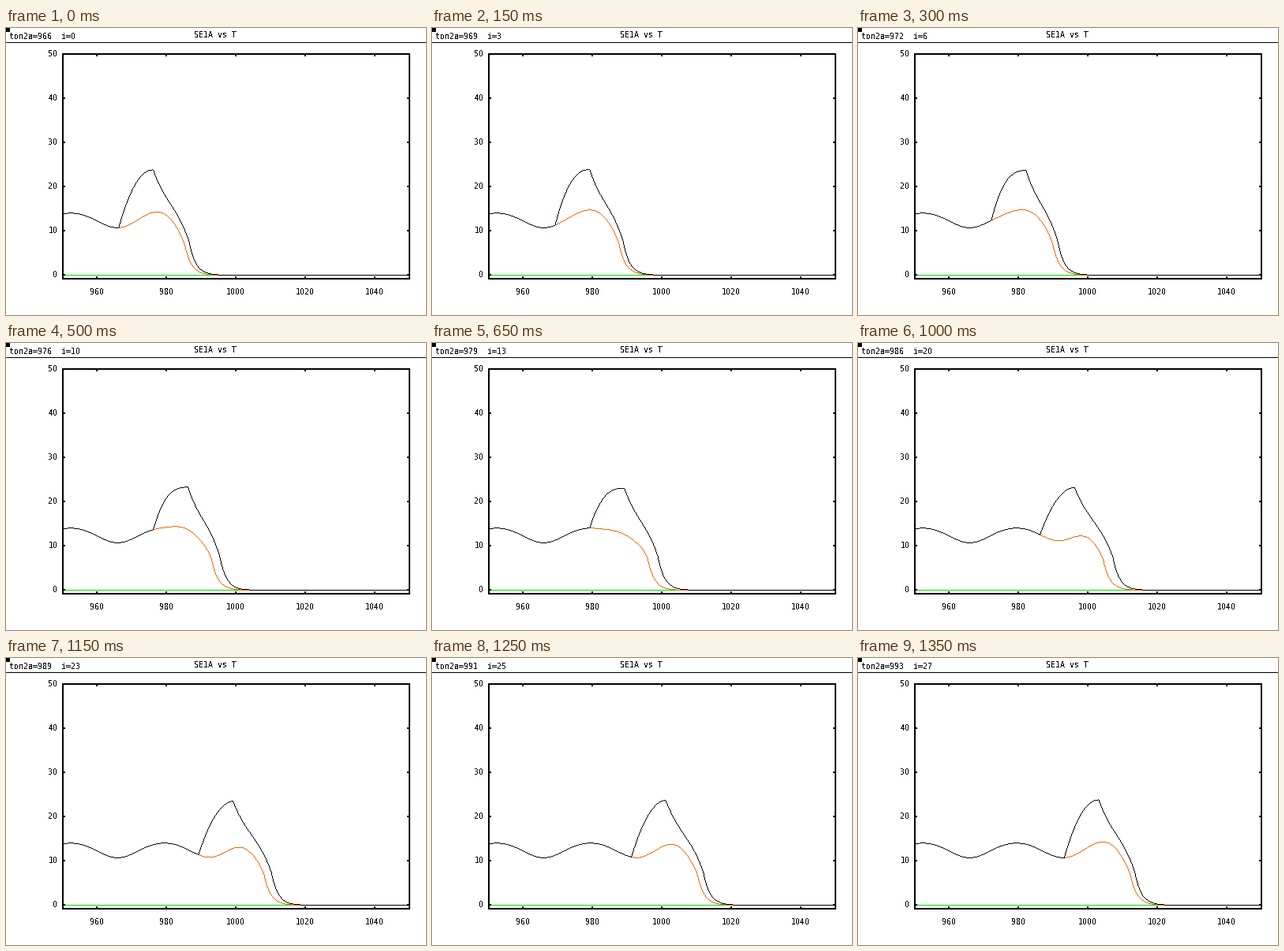
A matplotlib script that plays this animation: 532x364 px, repeating every 1.4 s.

```python
import numpy as np
import matplotlib.pyplot as plt
from matplotlib.animation import FuncAnimation
from matplotlib.patches import Rectangle

W, H = 532, 364
FRAMES, STEP_MS = 28, 50
T_MIN, T_MAX = 950, 1050
PERIOD = 27          # background oscillation; the response repeats with it
FIRST_ON, PULSE = 966, 10
TAU = 1.9            # decay time of the final drop
LOW_END, HIGH_END = 7.0, 7.5   # levels where the final drop begins
WHITE, BLACK = (255, 255, 255), (0, 0, 0)
GREEN, ORANGE = (0, 224, 0), (238, 102, 0)
plt.rcParams["font.family"] = "DejaVu Sans Mono"
plt.rcParams["text.antialiased"] = False


def px(t):
    return 72 + 4.39 * (np.asarray(t) - T_MIN)


def py(v):
    return 313 - 5.6 * np.asarray(v)


def swing(i, mean, amp, peak):
    """Quantity that varies with the pulse delay i, largest at delay `peak`."""
    return mean + amp * np.cos(2 * np.pi * (i - peak) / PERIOD)


def background(t):
    a = 2 * np.pi * (t - 979.2) / PERIOD
    return 12.5 + 1.65 * np.cos(a) - 0.1 * np.cos(2 * a)


def with_drop(s, end, body, level):
    tail = level * np.exp(-np.maximum(s - end, 0) / TAU)
    return np.where(s < end, body, tail)


def low_curve(s, i):
    """Background with a small bump, bending down ever faster."""
    on = FIRST_ON + i
    end = swing(i, 17.9, 1.2, 25.5)
    u = np.minimum(s / end, 1)
    bump = swing(i, 1.0, 0.25, 14) * np.sin(np.pi * u ** 1.3) ** 2
    sink = (background(on + end) - LOW_END) * u ** swing(i, 7.1, 2.6, 10)
    return with_drop(s, end, background(on + s) + bump - sink, LOW_END)


def high_curve(s, i):
    """Eased rise while the pulse is on, then a fall to the final drop."""
    start = background(FIRST_ON + i)
    peak = swing(i, 23.45, 0.45, 2)
    end = swing(i, 20.1, 1.0, 21.5)
    u = np.clip(s / PULSE, 0, 1)
    rise = start + (peak - start) * (1 - (1 - u) ** swing(i, 2.4, 0.45, 9.5))
    w = np.clip((s - PULSE) / (end - PULSE), 0, 1)
    fall = peak - (peak - HIGH_END) * (1.4 * w - 1.3 * w ** 2 + 0.9 * w ** 3)
    return with_drop(s, end, np.where(s < PULSE, rise, fall), HIGH_END)


def trace(canvas, t, v, color):
    """One-pixel line without smoothing: one dot per step of the longer axis."""
    x, y = px(t), py(v)
    steps = np.maximum(abs(np.diff(x)), abs(np.diff(y)))
    along = np.append(0, np.cumsum(steps))
    at = np.arange(along[-1])
    cols = np.rint(np.interp(at, along, x)).astype(int)
    rows = np.rint(np.interp(at, along, y)).astype(int)
    canvas[rows, cols] = color


fig = plt.figure(figsize=(W / 100, H / 100), dpi=100, facecolor="white")
ax = fig.add_axes([0, 0, 1, 1])
plot = ax.imshow(np.full((H, W, 3), 255, np.uint8), interpolation="nearest",
                 aspect="auto", extent=(-.5, W - .5, H - .5, -.5))
ax.axis("off")


def block(x, y, w, h):
    ax.add_patch(Rectangle((x - .5, y - .5), w, h, fc="black", lw=0,
                           antialiased=False, zorder=5))


def plain(text):
    """Use the letter O for zeros, as the font's own zero is dotted."""
    return text.replace("0", "O")


def label(x, y, text, ha="left"):
    return ax.text(x, y, plain(text), size=7.2, ha=ha, va="baseline", color="black")


# Header
block(0, 0, 5, 5)
block(0, 18, W, 1)
status = label(4, 14, "")
label(238, 12, "SE1A vs T")

# Frame, ticks and tick labels
for y in (32, 317):
    block(71, y, 441, 2)
for x in (71, 510):
    block(x, 32, 2, 287)
for v in range(0, 51, 10):
    y = int(py(v))
    for x in (71, 508):
        block(x, y - 1, 4, 2)
    label(65, y + 3, str(v), "right")
for t in range(960, 1041, 20):
    x = int(px(t))
    for y in (32, 315):
        block(x - 1, y, 2, 4)
    label(x - .5, 338, str(t), "center")


def draw(i):
    on = FIRST_ON + i
    before = np.linspace(T_MIN, on, 200)
    s = np.linspace(0, T_MAX - on, 1200)
    canvas = np.full((H, W, 3), WHITE, np.uint8)
    trace(canvas, [T_MIN, T_MAX], [0, 0], GREEN)
    trace(canvas, on + s, low_curve(s, i), ORANGE)
    trace(canvas, before, background(before), BLACK)
    trace(canvas, on + s, high_curve(s, i), BLACK)
    plot.set_data(canvas)
    status.set_text(plain(f"ton2a={on}  i={i}"))
    return plot, status


anim = FuncAnimation(fig, draw, frames=FRAMES, interval=STEP_MS,
                     repeat=True, repeat_delay=0)
plt.show()
```
